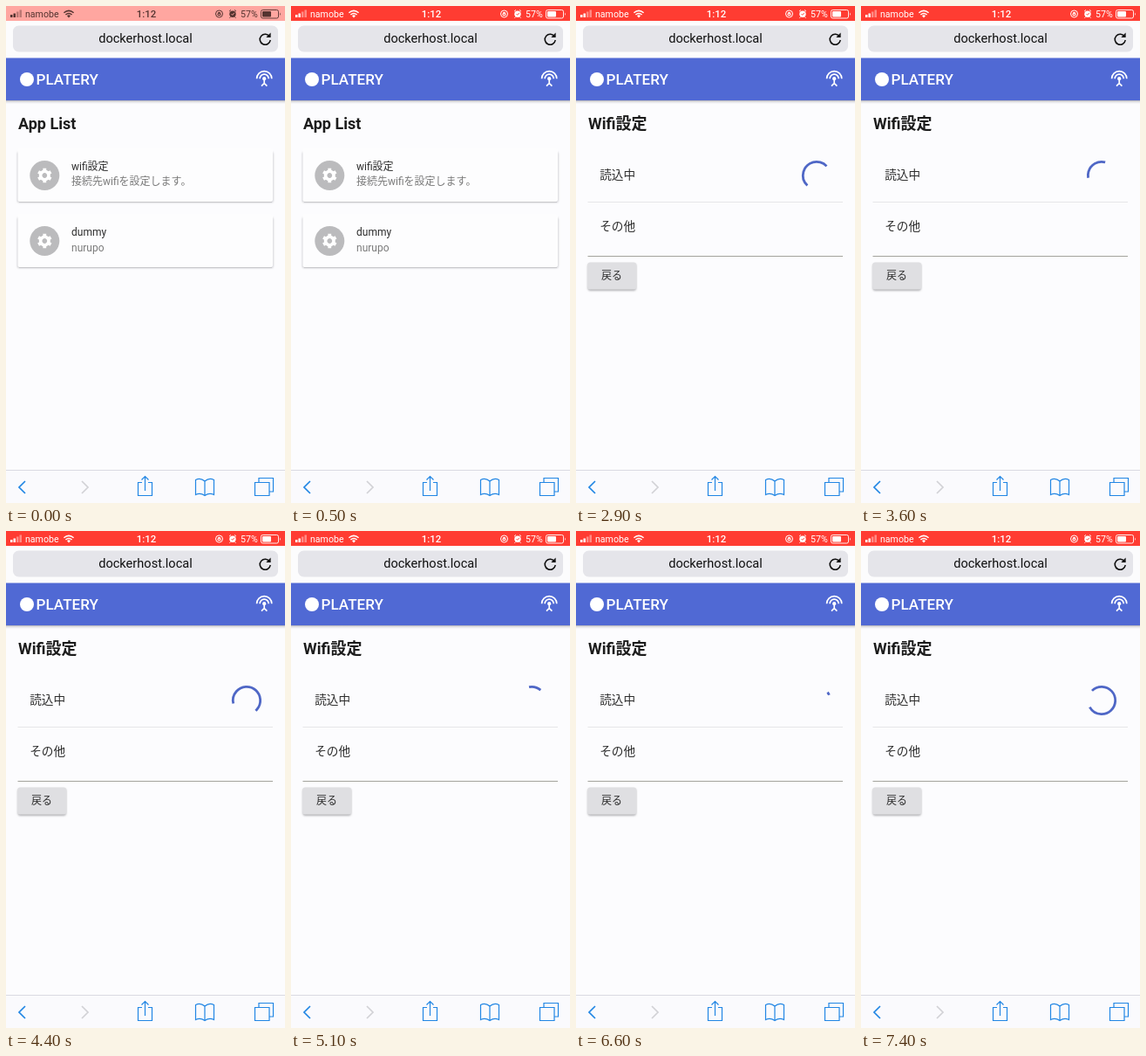
Write an HTML page that moves like this. It is 320 px wide and 569 px high and loops after 8000 ms.

```html
<!DOCTYPE html>
<html lang="ja">
<head>
<meta charset="utf-8">
<title>App List</title>
<style>
  html, body { margin: 0; width: 100%; height: 100%; overflow: hidden; background: #fcfcfe; }
  svg { display: block; width: 100vw; height: 100vh; }
  text { font-family: Roboto, "Noto Sans CJK JP", "Noto Sans CJK", sans-serif; fill: #2c2c2c; }
  .line { fill: none; stroke: currentColor; }
  .status text { font-size: 10.6px; fill: currentColor; }
  .h { font-size: 18px; font-weight: 700; fill: #1c1c1c; }
  .s { font-size: 12px; }
  .m { font-size: 13.65px; }
  .dim { fill: #7a7a7a; }
</style>
</head>
<body>
<svg viewBox="0 0 320 569">
  <defs>
    <filter id="soft" x="-10%" y="-20%" width="120%" height="160%"><feGaussianBlur stdDeviation="1"/></filter>
    <linearGradient id="shade" x2="0" y2="1">
      <stop stop-color="#93939a"/><stop offset=".4" stop-color="#dcdce0"/><stop offset="1" stop-color="#fcfcfe"/>
    </linearGradient>
    <g id="card">
      <rect x="13" y="167" width="293.5" height="58" rx="2" fill="#c6c6ca" filter="url(#soft)"/>
      <rect x="13.5" y="163" width="292.5" height="61" rx="2" fill="#fdfdfe"/>
      <path d="M15 224.5H305" stroke="#c8c8cb"/>
      <circle cx="44.3" cy="194" r="17" fill="#bbbbbd"/>
      <g transform="translate(44.3 194)" fill="none" stroke="#fff">
        <circle r="4.7" stroke-width="3.6"/>
        <path id="teeth" stroke-width="3.8"/>
      </g>
    </g>
  </defs>

  <rect width="320" height="569" fill="#fcfcfe"/>

  <rect id="statusBar" width="320" height="17"/>
  <g id="status" class="status">
    <g fill="currentColor">
      <path d="M5 10h2.5v3H5zM8.5 8.5H11V13H8.5z"/>
      <path d="M12 6.5h2.5V13H12zM15.5 4.5H18V13h-2.5z" opacity=".4"/>
      <path d="M72 13.5l-2-2.3a3 3 0 0 1 4 0z"/>
      <rect x="294" y="6" width="10" height="6.5" rx="1"/>
      <path d="M314 7.5q1.6 1.7 0 3.4z"/>
      <circle cx="260" cy="9.3" r="3.7"/>
    </g>
    <text x="22" y="13">namobe</text>
    <text x="161" y="13.2" text-anchor="middle" style="font-size:11.4px;font-weight:500">1:12</text>
    <text x="269" y="13">57%</text>
    <g class="line">
      <path d="M66.4 7.8q5.6-4.8 11.2 0M68.4 10q3.6-3 7.2 0" stroke-width="1.5"/>
      <circle cx="244.5" cy="9" r="4" stroke-width="1"/>
      <path d="M243 8.6h3v2h-3zM243.5 8.6v-1.2h2v1.2M256 6.2l2-1.8M264 6.2l-2-1.8M257.5 12.5l-1 1.2M262.5 12.5l1 1.2" stroke-width="1"/>
      <rect x="292.5" y="4.5" width="20" height="9.5" rx="2" stroke-width=".9"/>
    </g>
    <path id="clockHands" class="line" d="M258.4 9l1.3 1.3 2.2-2.5" stroke-width=".9"/>
  </g>

  <rect y="17" width="320" height="43" fill="#fcfcfd"/>
  <rect x="8" y="22.5" width="304" height="30" rx="6.5" fill="#e5e5ea"/>
  <text x="160" y="42.4" text-anchor="middle" style="font-size:14.6px;fill:#111">dockerhost.local</text>
  <path d="M302.4 35.2A6 6 0 1 0 303.2 39" fill="none" stroke="#111" stroke-width="1.6"/>
  <path d="M298.3 35.9h5.3v-5.5z" fill="#111"/>

  <rect y="107.500" width="320" height="4.500" fill="url(#shade)"/>
  <rect y="59.500" width="320" height="48.500" fill="#5069d4"/>
  <circle cx="24" cy="84" r="8" fill="#fff"/>
  <text x="34.5" y="90" style="font-size:17.07px;font-weight:500;fill:#fff">PLATERY</text>
  <g transform="translate(296.2 83.2)" fill="none" stroke="#fff" stroke-width="1.7">
    <path d="M-8.6 0a8.6 8.6 0 0 1 17.2 0M-5.1 0a5.1 5.1 0 0 1 10.2 0M0 1V5.4M-3.2 8.4L0 5.2l3.2 3.2"/>
    <circle r="2.1" fill="#fff" stroke="none"/>
  </g>

  <g id="listPage">
    <text class="h" x="14" y="141">App List</text>
    <use href="#card"/>
    <use href="#card" y="75"/>
    <text class="s" x="75" y="188">wifi設定</text>
    <text class="s dim" x="75" y="205.3">接続先wifiを設定します。</text>
    <text class="s" x="75" y="263.3">dummy</text>
    <text class="s dim" x="75" y="280.5">nurupo</text>
  </g>

  <g id="wifiPage">
    <text class="h" x="14" y="141">Wifi設定</text>
    <text class="m" x="27.2" y="198">読込中</text>
    <path d="M13.5 224.5H306" stroke="#e6e6e8"/>
    <text class="m" x="27.2" y="256.5">その他</text>
    <path d="M13.5 286.5H306" stroke="#a3a39c"/>
    <rect x="13.5" y="295" width="55.5" height="31" rx="3" fill="#b0b0b4" filter="url(#soft)"/>
    <rect x="13" y="293.5" width="56.5" height="31" rx="3.5" fill="#dfdfe2"/>
    <text class="s" x="41" y="312.5" text-anchor="middle">戻る</text>
    <g transform="translate(276 194) scale(.7758)">
      <circle id="spinner" r="20.2" fill="none" stroke="#4f67c6" stroke-width="3.6"/>
    </g>
  </g>

  <rect y="531" width="320" height="38" fill="#fafafd"/>
  <path d="M0 531.5H320" stroke="#dadae2"/>
  <g class="line" color="#2186e4" stroke-width="1.2">
    <path d="M22 544l-7 7 7 7" stroke-width="1.7"/>
    <path d="M87 544l7 7-7 7" stroke="#d2d2d6" stroke-width="1.7"/>
    <path d="M156 545.5h-4.5v15h16v-15H163M159.5 555v-16M155.5 542.5l4-4 4 4"/>
    <path d="M228 544q-5-4.5-10.5-1.5v17q5.5-2.5 10.5 1 5-3.5 10.5-1v-17q-5.5-3-10.5 1.5v16.5"/>
    <path d="M285.5 545.5h16.5v15h-16.5zM290 545.5v-5h16.5v15.5H302"/>
  </g>
</svg>
<script>
  const $ = id => document.getElementById(id);
  const LOOP = 8000, STEP = 100, LAST_STEP = 7400, PAGE_SWITCH = 2400;
  const SPIN = 1400, SPIN_START = 2491;

  $('teeth').setAttribute('d', Array.from({ length: 6 }, (_, i) => {
    const a = i * Math.PI / 3 + Math.PI / 2, x = Math.cos(a), y = Math.sin(a);
    return `M${5 * x} ${5 * y}L${8.3 * x} ${8.3 * y}`;
  }).join(''));

  const mix = (from, to, k) => `rgb(${from.map((v, i) => Math.round(v + (to[i] - v) * k))})`;

  // cubic-bezier(.42, 0, .58, 1)
  function easeInOut(x) {
    let lo = 0, hi = 1;
    for (let i = 0; i < 24; i++) {
      const u = (lo + hi) / 2, v = 1 - u;
      if (1.26 * u * v * v + 1.74 * u * u * v + u ** 3 < x) lo = u; else hi = u;
    }
    return lo * lo * (3 - 2 * lo);
  }

  function drawSpinner(t) {
    const p = ((t - SPIN_START) / SPIN % 1 + 1) % 1;
    const grow = easeInOut(Math.min(1, p * 2));
    const shrink = easeInOut(Math.max(0, p * 2 - 1));
    const spinner = $('spinner');
    spinner.setAttribute('transform', `rotate(${360 * p})`);
    spinner.setAttribute('stroke-dasharray', `${1 + 99 * grow} 200`);
    spinner.setAttribute('stroke-dashoffset', -15 * grow - 110 * shrink);
  }

  function draw(now) {
    const t = Math.min(LAST_STEP, Math.floor(now % LOOP / STEP) * STEP);
    const lit = Math.min(1, t / 300);
    const barColor = mix([255, 166, 160], [255, 60, 50], lit);
    $('statusBar').setAttribute('fill', barColor);
    $('status').style.color = mix([84, 52, 48], [255, 255, 255], lit);
    $('clockHands').style.stroke = barColor;
    $('listPage').style.display = t < PAGE_SWITCH ? '' : 'none';
    $('wifiPage').style.display = t < PAGE_SWITCH ? 'none' : '';
    drawSpinner(t);
  }

  const start = performance.now();
  function tick() {
    draw(performance.now() - start);
    requestAnimationFrame(tick);
  }
  tick();
</script>
</body>
</html>
```
